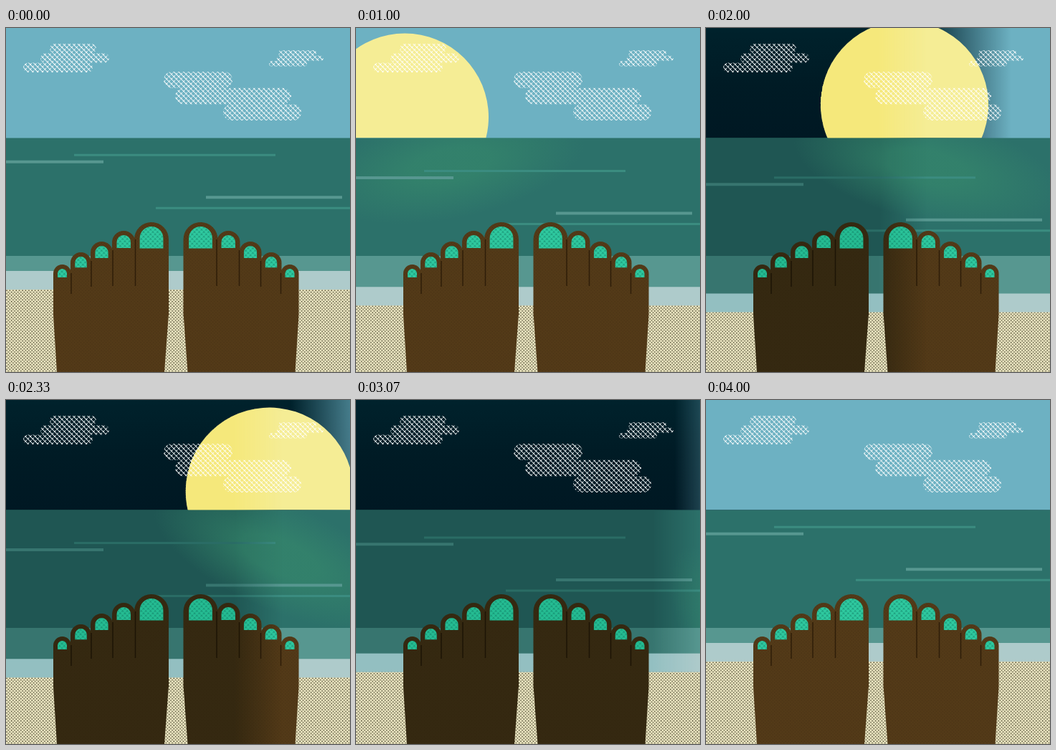
An HTML page for the animation above (4.07 s loop, 480 px wide and 480 px high).

```html
<!DOCTYPE html>
<html lang="en">
<head>
<meta charset="utf-8">
<title>Day at the beach</title>
<style>
html, body { margin: 0; width: 100%; height: 100%; overflow: hidden; background: #6db1c2; }
svg { display: block; width: 100vw; height: 100vh; }
</style>
</head>
<body>
<svg viewBox="0 0 480 480">
  <defs>
    <pattern id="sand" width="4.4" height="4.4" patternUnits="userSpaceOnUse">
      <rect width="4.4" height="4.4" fill="#ebe5c1"/>
      <path d="M1.1 1.1h.01M3.3 3.3h.01" stroke="#45422a" stroke-width="1.6" stroke-linecap="round"/>
    </pattern>
    <pattern id="skin" width="4.4" height="4.4" patternUnits="userSpaceOnUse">
      <path d="M1.1 1.1h.01M3.3 3.3h.01" stroke="#2a1a06" stroke-opacity=".3" stroke-width="1.4" stroke-linecap="round"/>
    </pattern>
    <pattern id="polish" width="4.6" height="4.6" patternUnits="userSpaceOnUse" patternTransform="rotate(45)">
      <path d="M0 1h3.4M1 0v3.4" stroke="#0b6b55" stroke-opacity=".5" stroke-width=".9"/>
    </pattern>
    <pattern id="hatch" width="4.8" height="4.8" patternUnits="userSpaceOnUse" patternTransform="rotate(45)">
      <path d="M0 2.4h4.8M2.4 0v3.6" stroke="#fff" stroke-opacity=".9" stroke-width=".95"/>
    </pattern>
    <linearGradient id="nightSky" x2="0" y2="1">
      <stop stop-color="#00222c"/><stop offset=".5" stop-color="#001b25"/><stop offset="1" stop-color="#001823"/>
    </linearGradient>
    <linearGradient id="skyEdge" gradientUnits="userSpaceOnUse">
      <stop stop-color="#fff"/><stop offset="1"/>
    </linearGradient>
    <linearGradient id="groundEdge" gradientUnits="userSpaceOnUse">
      <stop stop-color="#fff"/><stop offset="1"/>
    </linearGradient>
    <linearGradient id="dawnEdge" gradientUnits="userSpaceOnUse" x1="0" x2="0">
      <stop stop-opacity="0"/><stop offset="1"/>
    </linearGradient>
    <radialGradient id="glow">
      <stop offset=".3" stop-color="#378b6c" stop-opacity=".6"/>
      <stop offset="1" stop-color="#378b6c" stop-opacity="0"/>
    </radialGradient>
    <mask id="skyMask" maskUnits="userSpaceOnUse" x="0" y="0" width="480" height="480">
      <rect width="480" height="480" fill="url(#skyEdge)"/>
    </mask>
    <mask id="groundMask" maskUnits="userSpaceOnUse" x="0" y="0" width="480" height="480">
      <rect width="480" height="480" fill="url(#groundEdge)"/>
      <rect width="480" height="480" fill="url(#dawnEdge)"/>
    </mask>
    <clipPath id="aboveSea"><rect width="480" height="153.5"/></clipPath>
    <clipPath id="inSea"><rect y="153.5" width="480" height="165"/></clipPath>
  </defs>
  <rect width="480" height="160" fill="#6db1c2"/>
  <g mask="url(#skyMask)"><rect width="480" height="154" fill="url(#nightSky)"/></g>
  <rect id="dawn" width="480"/>
  <g id="day"></g>
  <g id="night" mask="url(#groundMask)"></g>
  <path id="clouds" fill="url(#hatch)"/>
</svg>
<script>
const $ = id => document.getElementById(id);
const set = (el, attrs) => { for (const k in attrs) el.setAttribute(k, attrs[k]); };
const setAll = (sel, attrs) => document.querySelectorAll(sel).forEach(el => set(el, attrs));

const LOOP = 4070, STEPS = 61, FPS = 15;
const HORIZON = 153.5;
const PIVOT = { x: 213, y: 603 };

// left, right, top
const toes = [[66, 91, 330], [90, 119, 313], [118, 149, 298], [148, 180.5, 283], [179, 227, 271]];

function arch(left, right, top, bottom) {
  const r = (right - left) / 2;
  return `M${left} ${bottom}V${top + r}A${r} ${r} 0 0 1 ${right} ${top + r}V${bottom}Z`;
}

function nail([left, right, top]) {
  const width = (right - left) * .86 - 8.5;
  const x = (left + right - width) / 2, y = top + 6;
  return arch(x, x + width, y, y + width * .93);
}

function foot(c) {
  const outline = toes.map(toe => arch(...toe, 400)).join('') +
    'M66 399H227L226.5 405L221 480H71L66.3 405Z';
  const nails = toes.map(nail).join('');
  const creases = toes.slice(0, -1)
    .map(([, right, top], i) => `M${right} ${top + 12}V${Math.max(360, 371 - 10 * i)}`).join('');
  return `<path d="${outline}" fill="${c.skin}"/><path d="${outline}" fill="url(#skin)"/>
    <path d="${creases}" stroke="${c.crease}" stroke-width="1.5"/>
    <path d="${nails}" fill="${c.nail}"/><path d="${nails}" fill="url(#polish)"/>`;
}

function scene(c) {
  const feet = foot(c);
  return `<g clip-path="url(#aboveSea)">
      <circle class="orbit" cx="${PIVOT.x}" cy="${PIVOT.y - 500}" r="117" fill="${c.sun}"/>
    </g>
    <rect y="${HORIZON}" width="480" height="165" fill="${c.sea}"/>
    <g clip-path="url(#inSea)"><g class="orbit glow">
      <ellipse cx="${PIVOT.x}" cy="${PIVOT.y - 420}" rx="190" ry="75" fill="url(#glow)"
        transform="rotate(5.7 ${PIVOT.x} ${PIVOT.y})"/>
    </g></g>
    <rect y="318" width="480" height="90" fill="${c.wet}"/>
    <g class="tide">
      <path d="M95 177.3H376M209 251.3H480" stroke="${c.ripple}" stroke-width="3"/>
      <path d="M0 186.7H136M279 236.3H469" stroke="${c.wet}" stroke-width="4"/>
      <rect y="339" width="480" height="30" fill="${c.foam}"/>
    </g>
    <rect class="sand" width="480" height="130" fill="url(#sand)"/>
    ${feet}<g transform="translate(474.5 0) scale(-1 1)">${feet}</g>`;
}

$('day').innerHTML = scene({
  sun: '#f5ed95', sea: '#2c716a', wet: '#579790', ripple: '#3b8c80',
  foam: '#aecbcb', skin: '#533a18', crease: '#2f1e09', nail: '#2fcaa0'
});
$('night').innerHTML = scene({
  sun: '#f5e87b', sea: '#1f5653', wet: '#37756f', ripple: '#2a6c65',
  foam: '#93bfc1', skin: '#352911', crease: '#1d1406', nail: '#25bd93'
});

// each cloud is three stacked bars, given by their left and right ends
const clouds = [
  { top: 22, height: 13.3, bars: [[61, 126], [48, 144], [24, 121]] },
  { top: 61, height: 22.7, bars: [[220, 316], [236, 398], [303, 412]] },
  { top: 31, height: 7.5, bars: [[380, 433], [378, 443], [367, 420]] }
];

function bar(left, right, top, height) {
  const r = height / 2;
  return `M${left + r} ${top}H${right - r}a${r} ${r} 0 0 1 0 ${height}H${left + r}a${r} ${r} 0 0 1 0 ${-height}Z`;
}

// a single path, so that bars share one hatch
set($('clouds'), {
  d: clouds.flatMap(({ top, height, bars }) =>
    bars.map(([left, right], i) => bar(left, right, top + i * height, height))).join('')
});

const clamp = x => Math.max(0, Math.min(1, x));

// rises to stop at `end` when s reaches `rest`
const settle = (s, end, rest, pull) => end - pull * Math.max(0, rest - s) ** 2;

function tide(s) {
  const phase = s * 1.5 % 2;
  return 31.5 * (phase < 1 ? phase ** 1.5 : Math.cos((phase - 1) * Math.PI / 2));
}

// s is the time in seconds
function draw(s) {
  const angle = -40.4 + 27.93 * s - 6.75 * s ** 2 + 2.363 * s ** 3;
  setAll('.orbit', { transform: `rotate(${angle} ${PIVOT.x} ${PIVOT.y})` });
  setAll('.glow', { opacity: clamp(s / .4) });

  const shift = tide(s);
  setAll('.tide', { transform: `translate(0 ${shift})` });
  setAll('.sand', { y: 365 + shift });

  const sky = settle(s, 510, 2.76, 259), ground = settle(s, 455, 3.365, 97);
  set($('skyEdge'), { x1: sky - 65, x2: sky + 65 });
  set($('groundEdge'), { x1: ground - 33, x2: ground + 33 });

  // daylight returns from below
  const front = 320 - (s - 3.467) * 600;
  set($('dawnEdge'), { y1: front - 35, y2: front + 30 });
  const rise = Math.min(HORIZON, 26.5 * Math.max(0, s * 7.5 - 25) ** 1.45);
  const u = clamp((s - 3.467) / .48);
  set($('dawn'), {
    y: HORIZON - rise, height: rise,
    fill: `rgb(${71 + 38 * u},${155 + 22 * u},${183 + 11 * u})`
  });
}

const start = performance.now();
function tick() {
  const t = (performance.now() - start) % LOOP;
  draw(Math.floor(t / LOOP * STEPS + .2) % STEPS / FPS);
  requestAnimationFrame(tick);
}
tick();
</script>
</body>
</html>
```
